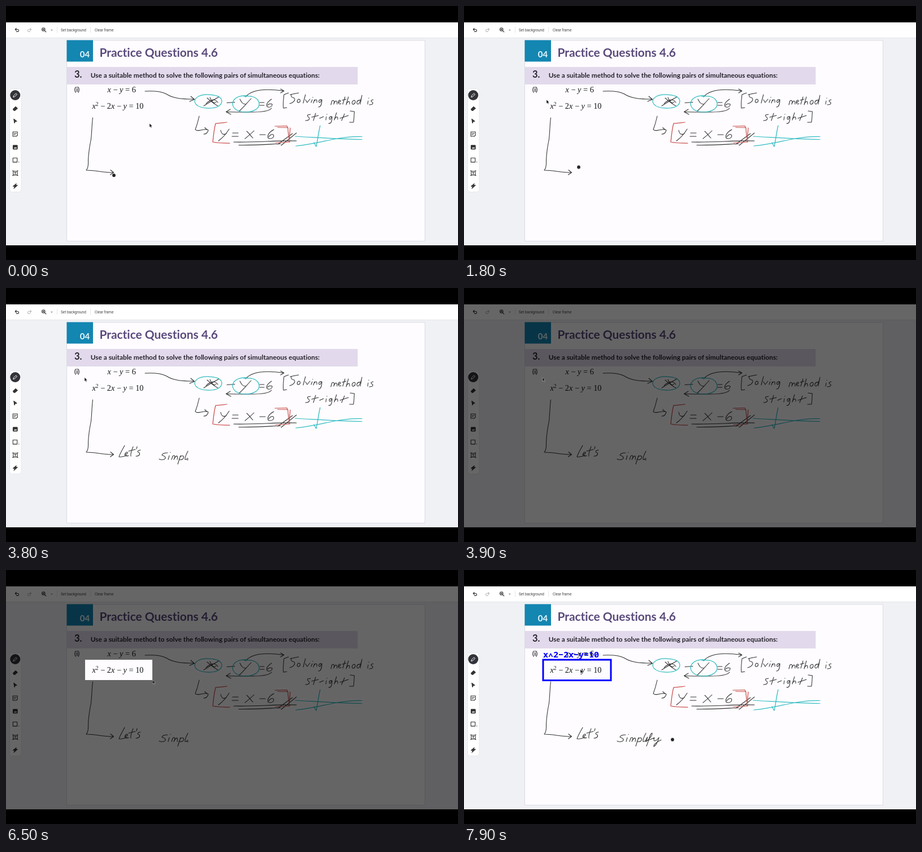
Write an HTML page that moves like this. It is 800 px wide and 450 px high and loops after 8 s.

```html
<!DOCTYPE html>
<html lang="en">
<head>
<meta charset="utf-8">
<title>Practice Questions</title>
<style>
html, body { margin: 0; width: 800px; height: 450px; overflow: hidden; background: #000; }
svg { position: absolute; left: 0; top: 0; display: block; }
.ink { fill: none; stroke: #333; stroke-width: 1.05; stroke-linecap: round; stroke-linejoin: round; }
.teal { stroke: #2fbcc0; stroke-width: 1.25; }
.red { stroke: #c9504c; stroke-width: 1.25; }
.lato { font-family: Lato, sans-serif; font-weight: 700; font-variant-ligatures: none; fill: #26232b; }
.math { font: 14.3px "Liberation Serif", serif; fill: #161616; }
.menu { font: 6.45px Roboto, sans-serif; fill: #444; }
.icon { fill: none; stroke: #333; stroke-width: 1.1; stroke-linejoin: round; stroke-linecap: round; }
.solid { fill: #333; }

#stage { position: absolute; left: 0; top: 29px; width: 800px; height: 395px; overflow: hidden; }
#hole {
  position: absolute; left: 140px; top: 130px;
  box-shadow: 0 0 0 900px rgba(0, 0, 0, .6);
  animation: drag 8s linear infinite, dim 8s step-end infinite;
}
#cursor { animation: cursor 8s ease-in-out infinite; }
#dot { animation: dot 8s ease-in-out infinite, hover 8s step-end infinite; }
#nib { animation: press 8s step-end infinite; }
#frame { animation: frame 8s step-end infinite; }
#label { font: 700 15px "Noto Sans Mono", monospace; fill: #00f; animation: label 8s step-end infinite; }

@keyframes drag {
  0%, 49% { width: 0; height: 0; }
  56.25% { width: 102px; height: 36px; }
  60%, 100% { width: 119px; height: 36px; }
}
@keyframes dim { 0% { opacity: 0; } 48.6% { opacity: 1; } 82% { opacity: 0; } }
@keyframes frame {
  0% { opacity: 0; stroke: #0f0; }
  82% { opacity: 1; stroke: #0f0; }
  87.5% { opacity: 1; stroke: #00f; }
}
@keyframes label { 0% { opacity: 0; } 87.5% { opacity: 1; } }
@keyframes cursor {
  0% { transform: translate(254px, 208px); }
  22.5% { transform: translate(146px, 166px); }
  47%, 49% { transform: translate(139px, 158.5px); animation-timing-function: linear; }
  56.25% { transform: translate(242px, 195px); animation-timing-function: linear; }
  60%, 83% { transform: translate(259.5px, 195px); }
  97%, 100% { transform: translate(206px, 176px); }
}
@keyframes dot {
  0% { transform: translate(191px, 300px); }
  22.5% { transform: translate(203px, 285.5px); }
  24% { transform: translate(209px, 280px); }
  91% { transform: translate(349px, 300px); }
  97%, 100% { transform: translate(369px, 300.5px); }
}
@keyframes hover { 0% { opacity: 1; } 23.1% { opacity: 0; } 91.2% { opacity: 1; } }
@keyframes press { 0% { opacity: 0; } 23.1% { opacity: 1; } 91.2% { opacity: 0; } }
</style>
</head>
<body>
<svg width="800" height="450" viewBox="0 0 800 450">
  <rect y="29" width="800" height="395" fill="#eff1f4"/>
  <rect y="29" width="800" height="27" fill="#fff"/>
  <path d="M0 56.5H800" stroke="#e3e5e9"/>

  <!-- top bar -->
  <g class="icon">
    <path d="M18.3 39.5L16.3 41.5L18.3 43.5M16.5 41.5H21A2 2 0 0 1 21 45.4H18.5"/>
    <path d="M42.7 39.5L44.7 41.5L42.7 43.5M44.5 41.5H40A2 2 0 0 0 40 45.4H42.5" stroke="#bbb"/>
    <circle cx="66.3" cy="41.5" r="2.7"/>
    <path d="M68.4 43.6L70.8 46M65.2 41.5H67.4M66.3 40.4V42.6"/>
    <path d="M80 42.2H82.2L81.1 43.3Z" stroke-width=".5"/>
    <path d="M90.5 37V47M149.500 37V47" stroke="#e0e0e4" stroke-width=".8"/>
  </g>
  <text class="menu" x="97" y="44.7">Set background</text>
  <text class="menu" x="157" y="44.7">Clear frame</text>

  <!-- side bar -->
  <rect x="6.5" y="146.5" width="20.5" height="183" rx="4" fill="#fff" stroke="#e6e7ec"/>
  <circle cx="16.3" cy="158" r="9" fill="#33343a"/>
  <path d="M12.8 161.5L13.6 158.8L17.6 154.8L19.5 156.7L15.5 160.7Z" fill="none" stroke="#fff"/>
  <g class="icon">
    <path class="solid" d="M12.5 183L17 178.5L20.3 181.3L16 185.2H14Z"/>
    <path class="solid" d="M13.8 200.3L19 204.2L16.4 204.6L15 207.4Z"/>
    <path d="M12.2 223H20.2V229L18 231H12.2ZM14 225.8H18.3M14 228H16.5"/>
    <rect class="solid" x="12.5" y="246.8" width="7.6" height="6.8" rx=".6"/>
    <path d="M13.6 252.4L15.4 250.2L16.6 251.4L17.8 249.8L19.2 252.4Z" fill="#fff" stroke="none"/>
    <rect x="12.3" y="269.2" width="7.4" height="7.4"/>
    <circle class="solid" cx="22.6" cy="276.4" r=".3" stroke-width=".6"/>
    <rect x="12.8" y="292.8" width="7.2" height="6.6"/>
    <path d="M14.8 294.8H18M16.4 294.8V297.8"/>
    <path d="M12 292H12.6M20.2 292H20.8M12 300.2H12.6M20.2 300.2H20.8" stroke-width="1.6"/>
    <path class="solid" d="M12.6 319.4L18.2 314.8L16.8 318L20.2 317.6L14 323.2L15.6 319.8Z"/>
  </g>

  <!-- slide -->
  <rect x="107.5" y="61" width="634" height="355.5" fill="#fefcff" stroke="#dcdde3"/>
  <rect x="107.5" y="60.5" width="46.5" height="38" fill="#1386b1"/>
  <rect x="108" y="108" width="514.5" height="31" fill="#e2d9ec"/>
  <text class="lato" x="130.8" y="91" font-size="15" style="fill:#e8f6fb">04</text>
  <text class="lato" x="165.5" y="90.3" font-size="20.9" style="fill:#5a4a7b">Practice Questions 4.6</text>
  <text class="lato" x="121" y="127" font-size="16.5">3.</text>
  <text class="lato" x="149.8" y="126.5" font-size="11.85">Use a suitable method to solve the following pairs of simultaneous equations:</text>
  <text class="lato" x="121" y="152" font-size="11.5">(i)</text>
  <text class="math" x="179.5" y="153"><tspan font-style="italic">x</tspan> − <tspan font-style="italic">y</tspan> = 6</text>
  <text class="math" x="152.5" y="182"><tspan font-style="italic">x</tspan><tspan font-size="9.5" dy="-5">2</tspan><tspan dy="5"> − 2</tspan><tspan font-style="italic">x</tspan> − <tspan font-style="italic">y</tspan> = 10</text>

  <!-- finished handwriting -->
  <path class="ink" d="M153.500 198C152 210 152 222 150.500 236C148 248 146 260 145.500 274C146 284 144 289 142 291C158 291 172 295 189 295M185 290.500L190.500 295L184.500 299
    M246 151C264 150 275 151 284 156C296 164 312 165 332 165M327 160L333.500 165.500L325 169
    M356 163C362 168 367 173 375 177M377 161C368 166 359 171 350 177M361 162C364 170 368 174 372 170M354 173C362 165 370 164 375 171
    M391 171.500L405 170.500
    M414 165C417 171 419 174 424 174M434 164C427 171 421 179 413 186
    M424 161C433 150 454 145 491 150.500M486 147L492 150.500L486 154
    M449 171H457M449 176H457
    M470 165C464 169 460 174 462 178C466 181 472 178 471 174C468 172 464 174 463 176
    M470 181C466 186 452 188 436 188C420 188 404 188 390 187.500M397 183L389.500 187.500L398 192
    M500 154L492 157C491 166 490 174 491 181L497 180
    M518 154C512 155 507 156 503 157M505 157C504 161 506 162 510 163C513 167 508 172 502 173
    M518 165C514 167 515 172 518 171C522 170 521 165 518 165M530 157L526 172M530 166L533 171L538 165M542 166L540 171M543 161.500V162M544 172L546 166M545 169C549 164 551 166 550 171M559 166C553 165 552 171 556 171L559 166C559 173 558 179 553 179
    M575 175L577 168C580 166 582 168 580 174C582 168 586 165 586 174M588 171C593 170 593 166 590 167C586 170 588 175 593 173M600 161L596 174M595 167L602 165M606 161L602 175C604 169 609 166 608 174M616 167C611 169 612 175 615 174C619 173 619 167 616 167M627 167C621 166 619 173 623 174C626 173 629 164 630 158L627 174
    M641 168L640 174M642 163V163.500M650 166C645 167 645 169 649 171C650 174 647 175 643 175
    M539 192L534 193C532 196 537 197 537 199C537 203 533 203 530 203M548 190L544 203M541 197L553 194M555 199L562 196M567 196L566 202M568 191.500V192M577 196C571 195 571 201 574 201L577 196C577 203 576 209 571 208M585 189L581 202C583 196 588 194 587 201M599 191C598 195 595 200 594 203M591 199L606 194
    M609 186L616.500 187C616 194 616 201 615 206L608 206
    M342 195C340 204 338 211 335 219C340 224 348 217 356 219M352 215C352 218 356 218 358 220C357 224 354 227 350 227
    M380 220C381 227 385 229 390 226M395 218C390 226 383 234 376 239
    M401 225H411M400 231H411
    M426 222C430 225 433 230 437 234M439 221C434 226 429 230 423 235
    M449 228H459M474 219C466 223 462 229 464 234C470 237 476 232 473 228C470 226 466 230 465 232
    M403 241C440 242 480 238 514 239M412 246.500C440 247 464 245 486 244M481 245L507 226M487 247L514 225"/>
  <path class="ink teal" d="M360 157C344 156 334 162 334 169C335 179 350 181 360 181C374 181 382 176 382 168C381 161 372 157 358 157
    M426 159C410 158 401 165 401 174C403 185 415 188 426 188C440 187 449 181 448 172C446 163 437 158 421 160
    M556 212C553 224 552 236 549 249M545 242L549 249M512 231C550 233 590 236 630 236.500M513 248C536 246 556 241 575 237C594 233 610 231 630 231.500"/>
  <path class="ink red" d="M391 206C383 207 377 208 371 208C368 219 367 231 366 241C376 243 386 243 396 243M476 213L497 212.500L499 216C499 225 501 233 502 241L477 242.500M481 215L498 215.500M503 216L501 241"/>

  <g id="writing"></g>
  <rect id="nib" x="-1.200" y="-2" width="2.800" height="4.500" rx="1" fill="#8a8a8a"/>
  <circle id="dot" r="2.900" fill="#222"/>
</svg>

<div id="stage"><div id="hole"></div></div>

<svg width="800" height="450" viewBox="0 0 800 450">
  <rect id="frame" x="140" y="159" width="120" height="36.500" fill="none" stroke-width="3"/>
  <text id="label" x="140" y="155">x<tspan dy="3">^</tspan><tspan dy="-3">2−2x−y=10</tspan></text>
  <path id="cursor" d="M0 0V6.800L1.600 5.400L2.700 7.800L3.900 7.200L2.800 4.900L4.900 4.700Z" fill="#111" stroke="#fff" stroke-width=".4"/>
</svg>

<script>
const LOOP = 8000;
const timing = { duration: LOOP, iterations: Infinity };
const layer = document.getElementById('writing');
const nibPath = [];

// Draws the strokes one after another between two times and leads the nib along them.
function write(start, end, strokes) {
  const at = i => (start + (end - start) * i / strokes.length) / LOOP;
  strokes.forEach((d, i) => {
    const path = document.createElementNS('http://www.w3.org/2000/svg', 'path');
    path.setAttribute('d', d);
    path.setAttribute('class', 'ink');
    layer.append(path);
    const length = path.getTotalLength();
    for (const part of [0, .5, 1]) {
      const { x, y } = path.getPointAtLength(length * part);
      nibPath.push({ offset: at(i + part), transform: `translate(${x}px, ${y}px)` });
    }
    path.setAttribute('pathLength', 1);
    path.style.strokeDasharray = '1.01 2';
    path.animate([
      { strokeDashoffset: 1.02, offset: 0 },
      { strokeDashoffset: 1.02, offset: at(i) },
      { strokeDashoffset: 0, offset: at(i + 1) },
      { strokeDashoffset: 0, offset: 1 }
    ], timing);
  });
}

write(1850, 2450, [
  'M210 279C206 286 202 293 200 299C205 300 210 298 214 296',
  'M210 295C216 294 217 290 213 291C209 294 210 300 217 297',
  'M225 281C222 288 220 293 221 298',
  'M217 289L229 286',
  'M232 281L231 285',
  'M238 287C232 288 232 291 236 292C238 296 234 298 230 298'
]);
write(2550, 3650, [
  'M286 292C281 292 277 293 276 296C281 298 284 300 281 303C277 305 273 304 271 303',
  'M289 297L287 304',
  'M291 291V291.5',
  'M293 304L295 298C299 295 300 298 297 304C301 296 305 295 303 304',
  'M309 297L304 312',
  'M308 299C313 295 317 299 313 303C310 305 307 304 306 303',
  'M322 289C319 295 316 300 317 304L321 303'
]);
write(6500, 6600, ['M321 303C322 301 323 299 324 297']);
write(6650, 7250, [
  'M325 296L322 304',
  'M322 304C328 300 334 292 333 289C329 289 328 300 323 312',
  'M325 302C330 300 334 299 337 297C335 302 336 304 340 302L345 297',
  'M345 297C343 304 341 310 336 313C335 309 342 304 349 301'
]);
document.getElementById('nib').animate([
  { ...nibPath[0], offset: 0 },
  ...nibPath,
  { ...nibPath[nibPath.length - 1], offset: 1 }
], timing);
</script>
</body>
</html>
```
